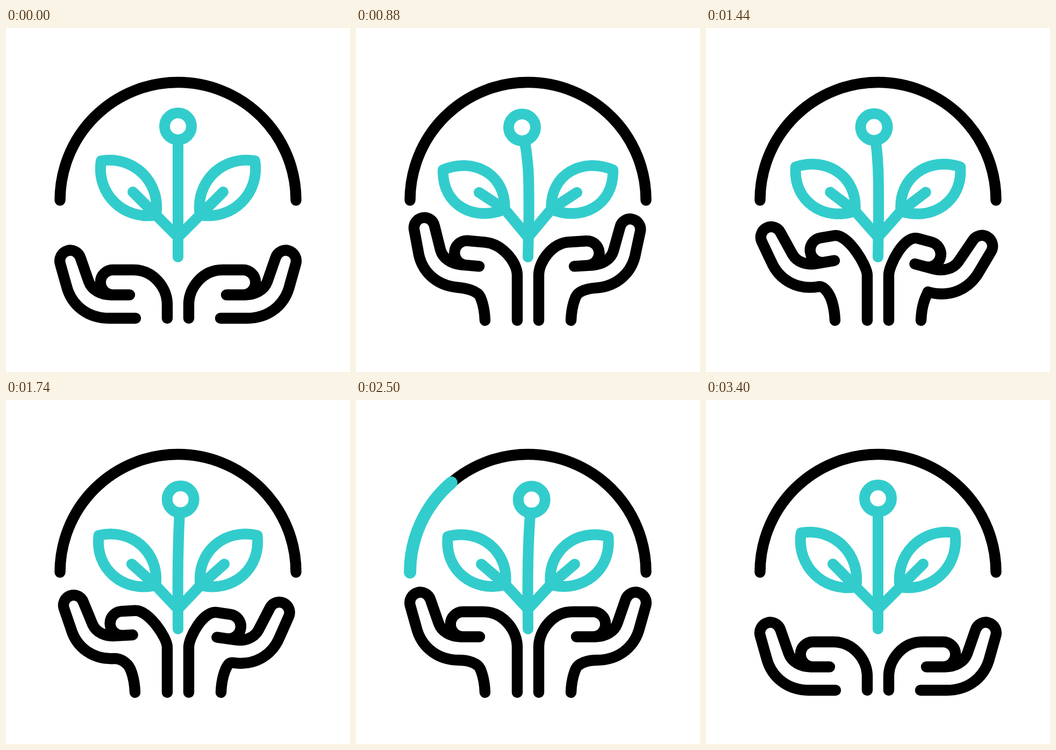
Recreate the animation shown at these times as an HTML page. Size 640 px wide and 640 px high, loop 3600 ms.

```html
<!DOCTYPE html>
<html lang="en">
<head>
<meta charset="utf-8">
<title>Plant and hands</title>
<style>
  html, body { margin: 0; width: 100%; height: 100%; overflow: hidden; background: #fff; }
  svg { display: block; width: 100vw; height: 100vh; }
  path, circle { fill: none; stroke-width: 20; stroke-linecap: round; stroke-linejoin: round; }
  .ink { stroke: #000; }
  .ink path, path.ink { stroke-width: 20.4; }
  .teal { stroke: #33cccc; }
  #sweep { stroke-width: 23; }
</style>
</head>
<body>
<svg viewBox="0 0 640 640">
  <path class="ink" d="M100.5 320.5A219.5 219.5 0 0 1 539.5 320.5"/>
  <path class="teal" id="sweep"/>
  <g class="ink">
    <path id="handL"/>
    <path id="handR" transform="translate(640) scale(-1 1)"/>
  </g>
  <g class="teal">
    <path id="leafL"/>
    <path id="leafR" transform="translate(640) scale(-1 1)"/>
    <path id="stem"/>
    <circle id="bud" r="25"/>
  </g>
</svg>
<script>
const LOOP = 3600, STEP = 20, LIFT = 56, MID = 320;
const $ = id => document.getElementById(id);
const setPath = (id, d) => $(id).setAttribute('d', d);

const ease = (t, from, to) => {
  const s = Math.min(1, Math.max(0, (t - from) / (to - from)));
  return s * s * (3 - 2 * s);
};
const mix = (a, b, k) => a.map((v, i) => v + (b[i] - v) * k);

// Eased blend through timed poses: [time, pose], ...
const track = (keys, t) => keys.reduce(([then, pose], [time, next]) =>
  [time, t > then ? mix(pose, next, ease(t, then, time)) : pose])[1];

// Hand pose: fingertip x, y, thumb end x, y, thumb tuck, drop (1 = resting low)
const UP = [120, 378, 230, 440.5, 0, 0];
const DOWN = [120, 378 + LIFT, 230, 440.5 + LIFT, 0, 1];

function hand([fx, fy, tx, ty, tuck, drop]) {
  // The palm turns and scales as one piece, so that both ends meet the pose
  const [ux, uy] = UP, thumbX = UP[2], thumbY = UP[3];
  const ax = ux - thumbX, ay = uy - thumbY, bx = fx - tx, by = fy - ty;
  const size = ax * ax + ay * ay;
  const c = (ax * bx + ay * by) / size, s = (ax * by - ay * bx) / size;
  const palm = (x, y) => {
    const u = x - thumbX, v = y - thumbY;
    return [tx + u * c - v * s, ty + u * s + v * c];
  };
  const cuff = (x, y, lowX) => mix([x, y], [lowX, 540], drop);

  const elbow = cuff(231, 500, 225), heel = palm(192, 484);
  const reach = 0.4 * (elbow[0] - heel[0]);
  const wrist = 460 + 54 * drop;
  return `M${cuff(240, 544, 241)}Q${cuff(239, 518, 233)} ${elbow}
    C${cuff(226, 489, 218)} ${palm(192 + reach, 484)} ${heel}
    C${palm(152, 484)} ${palm(121, 460)} ${palm(112, 422)}
    L${palm(101, 383)}A1 1 0 0 1 ${palm(138.5, 371.5)}L${palm(154, 416)}
    C${palm(160, 432)} ${palm(177, thumbY)} ${palm(195, thumbY)}L${palm(thumbX, thumbY)}
    M${palm(199 + tuck, thumbY)}A1 1 0 0 1 ${palm(199 + tuck, 394)}L${palm(237, 394)}
    C${palm(275 - tuck, 394)} 300,${wrist - 30 + tuck} 300,${wrist}V${544 - 4 * drop}`;
}

const handKeys = (inward, outward) => [
  [200, DOWN], [600, UP], [640, UP], [1160, inward], [1480, outward],
  [2150, inward], [2400, UP], [2800, UP], [3400, DOWN]
];
const leftHand = handKeys([136.5, 366, 228, 447, 12, 0], [121, 391, 239.5, 432, 12, 0]);
const rightHand = handKeys([143, 372, 239, 447, 12, 0], [126.5, 408, 252, 438.5, 12, 0]);

// Leaf pose: tip x, y, base x, y, vein x, y, narrow and wide bulge
function leaf([tx, ty, bx, by, vx, vy, narrow, wide]) {
  const dx = bx - tx, dy = by - ty, len = Math.hypot(dx, dy);
  const at = (k, bulge) => [tx + dx * k + dy / len * bulge, ty + dy * k - dx / len * bulge];
  return `M${at(0, 0)}C${at(0.25, narrow)} ${at(0.75, wide)} ${at(1, 0)}
    C${at(0.75, -narrow)} ${at(0.25, -wide)} ${at(0, 0)}Z
    M${vx},${vy}L${bx},${by}L${MID},389`;
}

// Stem pose: bud x, y, sideways bow of the middle and of the neck
function stem([x, y, bow, neck]) {
  const nx = MID + neck, ny = 256, len = Math.hypot(nx - x, ny - y);
  const end = mix([x, y], [nx, ny], 25 / len);
  return `M${MID},426Q${MID + bow * 0.5},388 ${MID + bow},350
    C${MID + bow},290 ${nx},${ny} ${end}`;
}

const swayKeys = (first, rest, second) =>
  [[640, rest], [1140, first], [1620, rest], [2140, second], [2640, rest]];
const leafUp = [177, 247, 279, 348, 236, 305, 50, 50];
const leafDown = [145, 283, 274, 325, 221, 307, 49, 66];
const leafKeys = swayKeys(leafDown, leafUp, leafDown);
const stemKeys = swayKeys([296.5, 187, 3.5, 5], [MID, 183, 0, 0], [355, 195.4, -2, 2]);

const arcPoint = k => [MID - 219.5 * Math.cos(Math.PI * k), 320.5 - 219.5 * Math.sin(Math.PI * k)];

function draw(t) {
  setPath('handL', hand(track(leftHand, t)));
  setPath('handR', hand(track(rightHand, t)));

  const blade = leaf(track(leafKeys, t));
  setPath('leafL', blade);
  setPath('leafR', blade);

  const sway = track(stemKeys, t);
  setPath('stem', stem(sway));
  $('bud').setAttribute('cx', sway[0]);
  $('bud').setAttribute('cy', sway[1]);

  const head = ease(t, 2300, 2880), tail = ease(t, 2800, 3400);
  setPath('sweep', head > tail
    ? `M${arcPoint(tail)}A219.5 219.5 0 0 1 ${arcPoint(head)}` : '');
}

const start = performance.now();
function tick() {
  const t = (performance.now() - start) % LOOP;
  draw(Math.floor(t / STEP) * STEP);
  requestAnimationFrame(tick);
}
tick();
</script>
</body>
</html>
```
